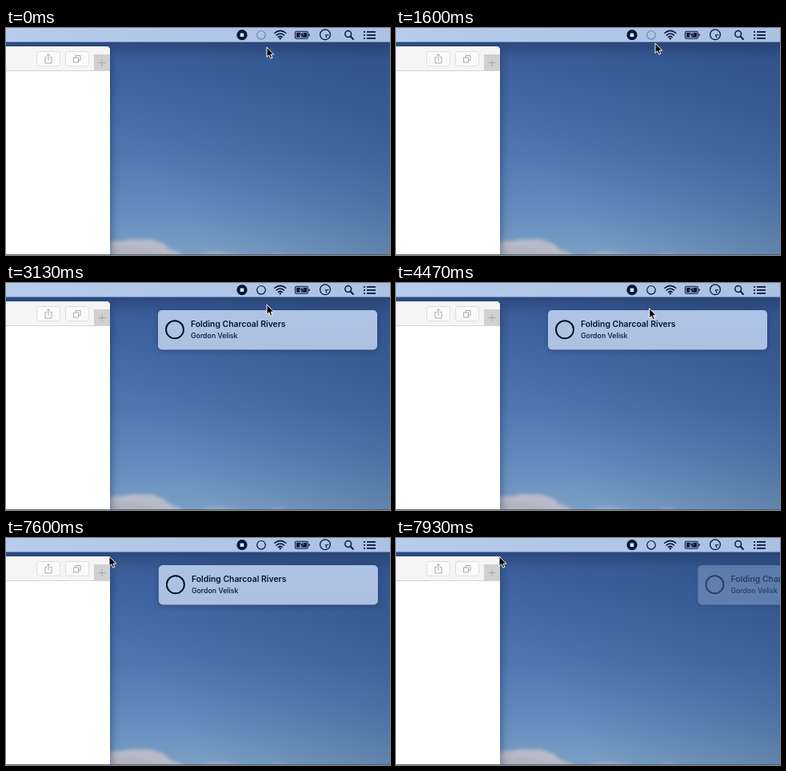
Write an HTML page that moves like this. It is 480 by 284 pixels and loops after 8 s.

```html
<!DOCTYPE html>
<html lang="en">
<head>
<meta charset="utf-8">
<title>Menu bar notification</title>
<style>
  html, body { margin: 0; width: 100%; height: 100%; overflow: hidden; background: #4a72ac; }
  svg { display: block; width: 480px; height: 284px; }
  text { font-family: Inter, "Open Sans", sans-serif; fill: #0b1530; }
  .line { fill: none; stroke: #061638; stroke-linecap: round; stroke-linejoin: round; }
  .tool { fill: none; stroke: #a2a2a2; stroke-width: .9; }
  .button { fill: #fafafa; stroke: #dedede; }
</style>
</head>
<body>
<svg viewBox="0 0 480 284">
  <defs>
    <linearGradient id="sky" x2="0" y2="1">
      <stop offset="0" stop-color="#385a98"/>
      <stop offset=".25" stop-color="#4267a6"/>
      <stop offset=".55" stop-color="#4f78b3"/>
      <stop offset=".8" stop-color="#638dbf"/>
      <stop offset="1" stop-color="#7b9fc4"/>
    </linearGradient>
    <linearGradient id="dusk" x1=".35" y1=".6" x2="1" y2=".3">
      <stop offset="0" stop-color="#274677" stop-opacity="0"/>
      <stop offset="1" stop-color="#274677" stop-opacity=".5"/>
    </linearGradient>
    <linearGradient id="barShade" x2="0" y2="1">
      <stop offset="0" stop-color="#1c3157" stop-opacity=".4"/>
      <stop offset="1" stop-color="#1c3157" stop-opacity="0"/>
    </linearGradient>
    <linearGradient id="bar">
      <stop offset="0" stop-color="#b7cbec"/>
      <stop offset="1" stop-color="#abc0e3"/>
    </linearGradient>
    <linearGradient id="card" x2="0" y2="1">
      <stop offset="0" stop-color="#afc3e6"/>
      <stop offset="1" stop-color="#adc1e2"/>
    </linearGradient>
    <filter id="soft" x="-20%" y="-60%" width="140%" height="220%"><feGaussianBlur stdDeviation="2"/></filter>
    <filter id="shade" x="-30%" y="-30%" width="160%" height="160%"><feGaussianBlur stdDeviation="6"/></filter>
    <filter id="cardShade" x="-10%" y="-30%" width="120%" height="160%"><feGaussianBlur stdDeviation="3"/></filter>
  </defs>

  <!-- desktop -->
  <rect width="480" height="284" fill="url(#sky)"/>
  <rect width="480" height="284" fill="url(#dusk)"/>
  <g filter="url(#soft)" fill="#c3c0ca">
    <path d="M126 270Q135 264 145 267Q158 262 168 265Q180 262 188 267Q199 269 203 276Q216 281 226 286H126Z" opacity=".85"/>
    <path d="M132 278Q150 271 166 276T200 284H132Z" fill="#b0aebd" opacity=".7"/>
    <path d="M240 284Q258 278 276 281T300 285H240ZM326 284Q340 279 354 284Z" opacity=".5"/>
  </g>
  <rect y="18" width="480" height="22" fill="url(#barShade)"/>

  <!-- browser window -->
  <rect x="-20" y="27" width="151" height="270" rx="5" fill="#12264a" opacity=".55" filter="url(#shade)"/>
  <path d="M0 23H125Q130 23 130 28V284H0Z" fill="#fff"/>
  <path d="M0 23H125Q130 23 130 28V53H0Z" fill="#f5f5f5"/>
  <path d="M110 33H130V53H110Z" fill="#d0d0d0"/>
  <path d="M0 53.5H130" stroke="#d4d4d4"/>
  <rect class="button" x="38.5" y="29.5" width="29" height="18" rx="3"/>
  <rect class="button" x="74.5" y="29.5" width="29" height="18" rx="3"/>
  <path class="tool" d="M51 36.500H49V44H57V36.500H55M53 40.500V32.500M50.800 34.700L53 32.500L55.200 34.700"/>
  <path class="tool" d="M84.500 37H90.500V43H84.500ZM87 37V34.500H93V40.500H90.500"/>
  <path class="tool" d="M115.500 43.500H124.500M120 39V48"/>

  <!-- notification -->
  <g id="note">
    <rect x="190" y="36" width="274" height="49" rx="5" fill="#12264a" opacity=".4" filter="url(#cardShade)"/>
    <rect x="190" y="34" width="274" height="49.500" rx="5" fill="url(#card)"/>
    <circle cx="211" cy="58.300" r="11" fill="none" stroke="#0a1020" stroke-width="1.900"/>
    <text x="231" y="54.500" font-size="10.400" font-weight="600">Folding Charcoal Rivers</text>
    <text x="231" y="69" font-size="8.800" font-weight="500">Gordon Velisk</text>
  </g>

  <!-- menu bar -->
  <rect width="480" height="17.500" fill="url(#bar)"/>
  <path d="M0 17.500H480" stroke="#6f8abb" stroke-width=".8"/>
  <circle cx="295" cy="8.700" r="6.600" fill="#061638"/>
  <rect x="292.700" y="6.400" width="4.600" height="4.600" rx=".6" fill="#dfe9fa"/>
  <rect id="press" x="307" width="24" height="17.500" fill="#3a72dc"/>
  <circle id="dot" class="line" cx="319" cy="8.800" r="5.300" stroke-width="1.200"/>
  <g class="line" stroke-width="1.500">
    <path d="M335.800 6.300Q342.800 .4 349.800 6.300M338.200 8.900Q342.800 5 347.400 8.900M340.500 11.400Q342.800 9.400 345.100 11.400"/>
    <circle cx="342.800" cy="13.200" r=".5"/>
  </g>
  <rect class="line" x="361.500" y="4.300" width="15.800" height="9" rx="1.500" stroke-width="1.100"/>
  <path d="M363 5.800H369L366 9.600H368.200L367 11.800H363ZM376 5.800H372L371.200 8H373.200L370 11.800H376ZM378.500 7Q380 7.300 380 8.800T378.500 10.600Z" fill="#061638"/>
  <path d="M371.500 4.800L367 9.300H369.800L368.500 13L373 8.300H370.300Z" fill="#061638"/>
  <circle class="line" cx="399" cy="8.300" r="6.400" stroke-width="1.200"/>
  <path class="line" d="M403 8.800H399.500L400.800 12" stroke-width="1.100"/>
  <circle class="line" cx="427.700" cy="7.500" r="3.900" stroke-width="1.500"/>
  <path class="line" d="M430.600 10.500L434 14" stroke-width="1.800"/>
  <path d="M447 4.800H449M451 4.800H462M447 8.800H449M451 8.800H462M447 12.800H449M451 12.800H462" stroke="#061638" stroke-width="1.800"/>

  <path d="M0 283.500H480" stroke="#4c5670" opacity=".8"/>

  <g id="cursor">
    <path d="M0 0V12.300L2.800 9.800L4.700 14.200L6.800 13.300L5 9.100H8.800Z" fill="#050505" stroke="#fff" stroke-width="1" stroke-linejoin="round"/>
  </g>
</svg>
<script>
const LOOP = 8000, FPS = 15, TRAVEL = 290;
const get = id => document.getElementById(id);
const note = get('note'), cursor = get('cursor'), dot = get('dot'), press = get('press');

// time, x, y of the pointer tip
const path = [
  [0, 326, 24], [200, 324.5, 20], [400, 321, 13], [530, 320, 11],
  [1000, 320, 11], [1200, 321, 12.5], [1400, 322.5, 15.5], [1600, 324, 19],
  [1800, 325, 25], [2070, 326, 27], [4333, 326, 27], [4533, 312, 34],
  [4733, 245, 41], [4933, 160, 35], [5067, 133, 25], [5133, 129, 23]
];

const clamp = v => Math.max(0, Math.min(1, v));
const span = (t, from, to) => clamp((t - from) / (to - from));

function along(t) {
  const i = path.findIndex(p => p[0] > t);
  if (i < 0) return path[path.length - 1].slice(1);
  const [t0, x0, y0] = path[i - 1], [t1, x1, y1] = path[i];
  const u = span(t, t0, t1);
  return [x0 + (x1 - x0) * u, y0 + (y1 - y0) * u];
}

function bezier(x1, y1, x2, y2) {
  const at = (s, a, b) => 3 * s * (1 - s) ** 2 * a + 3 * s * s * (1 - s) * b + s ** 3;
  return x => {
    let lo = 0, hi = 1;
    for (let i = 0; i < 20; i++) {
      const mid = (lo + hi) / 2;
      if (at(mid, x1, x2) < x) lo = mid; else hi = mid;
    }
    return at((lo + hi) / 2, y1, y2);
  };
}
const slide = bezier(.4, .1, .5, 1);

function draw(time) {
  const step = Math.floor((time % LOOP + 4) * FPS / 1000);
  const t = step * 1000 / FPS;

  const [x, y] = along(t);
  cursor.setAttribute('transform', `translate(${x} ${y})`);

  const pressed = t >= 799 && t < 999;
  press.style.opacity = pressed ? 1 : 0;
  dot.style.stroke = pressed ? '#fff' : '#061638';
  dot.style.opacity = pressed ? 1 : .35 + .65 * span(t, 2200, 2400);

  const enter = 1 - slide(span(t, 2667, 3133));
  const leave = 187 / TRAVEL * Math.max(0, (t - 7533) / 400) ** 3;
  note.setAttribute('transform', `translate(${(enter + leave) * TRAVEL} 0)`);
  note.style.opacity = clamp(1 - leave);
  note.style.display = t < 2700 ? 'none' : '';
}

function tick() {
  draw(performance.now());
  requestAnimationFrame(tick);
}
tick();
</script>
</body>
</html>
```
